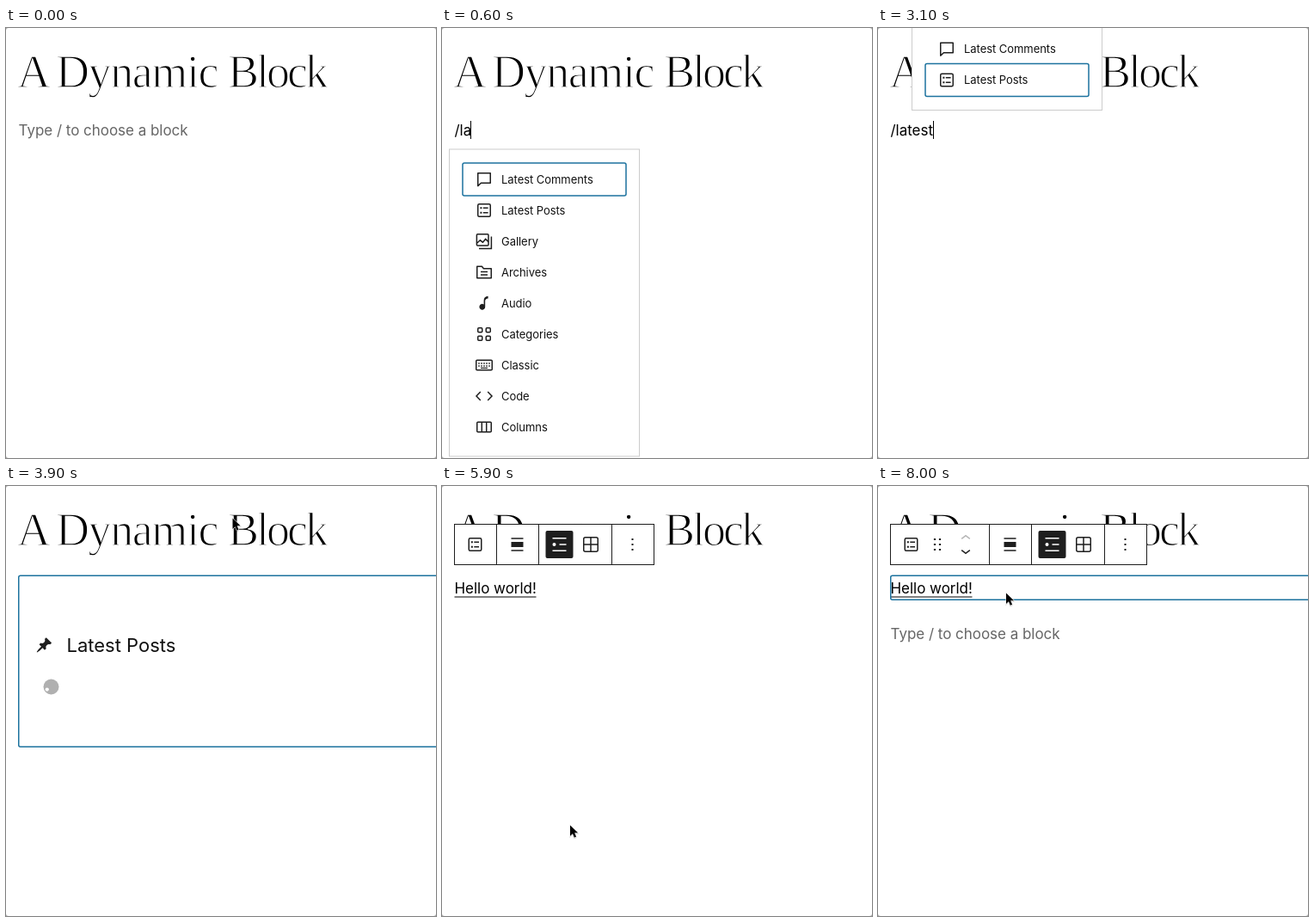
An HTML page that plays this animation: 500x500 px, repeating every 8700 ms.

```html
<!DOCTYPE html>
<html lang="en">
<head>
<meta charset="utf-8">
<title>A Dynamic Block</title>
<style>
  html, body { margin: 0; width: 100%; height: 100%; overflow: hidden; background: #a5a5a5; }
  svg { display: block; width: 500px; height: 500px; }
  text { font-family: Inter, "Open Sans", sans-serif; fill: #111; white-space: pre; }
  .body { font-size: 17px; letter-spacing: -.03px; fill: #000; }
  .hint { fill: #666; }
  .item { font-size: 13px; letter-spacing: -.05px; }
  .head { font-size: 22px; }
  /* A white outline thins the strokes to a light cut. */
  .title { font: 54px "Liberation Serif", serif; fill: #000; stroke: #fff; stroke-width: 1.4px; }
  .icon { fill: none; stroke: #1e1e1e; stroke-width: 1.5; }
  .solid { fill: #1e1e1e; stroke: none; }
  .ring { fill: none; stroke: #1c729e; stroke-width: 1.5; }
  .panel { fill: #fff; stroke: #ccc; }
  .bar { fill: #fff; stroke: #1e1e1e; }
</style>
</head>
<body>
<svg id="stage" viewBox="0 0 500 500">
  <rect width="500" height="500" rx="3" fill="#fff"/>
  <text class="title" y="69"><tspan x="13">A</tspan><tspan x="58" letter-spacing="-1.4">Dynamic</tspan><tspan x="258" letter-spacing="-3">Block</tspan></text>

  <text id="hint" class="body hint" x="14.5" y="125">Type / to choose a block</text>
  <text id="typed" class="body" x="14.5" y="125"></text>

  <g id="hello">
    <text class="body" x="14.5" y="125">Hello world!</text>
    <path d="M14.5 129H109.5" stroke="#000"/>
  </g>

  <g id="loading">
    <path class="solid" transform="translate(34.5 175)" d="M10.44 3.02l1.82-1.82 6.36 6.35-1.83 1.82c-1.05-.68-2.48-.57-3.41.36l-.75.75c-.92.93-1.04 2.35-.35 3.41l-1.83 1.82-2.41-2.41-2.8 2.79c-.42.42-3.38 2.71-3.8 2.29s1.86-3.39 2.28-3.81l2.79-2.79L4.1 9.36l1.83-1.82c1.05.69 2.48.57 3.4-.36l.75-.75c.93-.92 1.05-2.35.36-3.41z"/>
    <text class="head" x="70.5" y="192.5">Latest Posts</text>
    <circle cx="52.5" cy="233.5" r="9" fill="#b0b0b0"/>
    <circle id="dot" r="2.1" fill="#fff"/>
  </g>
  <rect id="frame" class="ring" x="14.75" y="104.25" width="520" rx="2"/>
  <g id="bars"></g>
  <path id="caret" stroke="#000"/>

  <g id="menu">
    <rect id="panel" class="panel" y="-35" width="221"/>
    <g id="rows"></g>
    <rect id="ring0" class="ring" x="15.5" y="-19" width="190" height="38" rx="2"/>
    <rect id="ring1" class="ring" x="15.5" y="17" width="190" height="38" rx="2"/>
  </g>

  <g id="mouse">
    <g transform="translate(.5 .5) scale(.86)">
      <path d="M0 1v14.5l3.4-3.2 2.2 5.2 2.6-1.1-2.2-5.1h4.6z" fill="#000" opacity=".15" stroke="#000" stroke-width="1.5"/>
      <path d="M0 0v14.5l3.4-3.2 2.2 5.2 2.6-1.1-2.2-5.1h4.6z" fill="#000" stroke="#fff" stroke-width="1.2" paint-order="stroke"/>
    </g>
  </g>
</svg>
<script>
const LOOP = 8700, STEP = 100;
const $ = id => document.getElementById(id);
const path = (d, extra = '') => `<path d="${d}" ${extra}/>`;
const solid = d => path(d, 'class="solid"');
const box = (x, y, w, h, r = 1) => `<rect x="${x}" y="${y}" width="${w}" height="${h}" rx="${r}"/>`;
const dots = (xs, ys, s) =>
  solid(xs.flatMap(x => ys.map(y => `M${x - s / 2} ${y - s / 2}h${s}v${s}h${-s}z`)).join(''));

// Icons are centred on 0,0.
const icons = {
  comment: path('M-7.25 -7.25H7.25V4.25H-3.6L-7.25 7.6Z', 'stroke-linejoin="round"'),
  posts: box(-7.25, -7.25, 14.5, 14.5, 1.5) + path('M-1.2 -2.7H4.6M-1.2 2.7H4.6') + dots([-3.6], [-2.7, 2.7], 2),
  gallery: box(-8.6, -8.2, 13.6, 13.2) + path('M8.4 -5.5V8.4H-6M-8.2 2L-4.6 -1.2L-1.6 1.2L1.6 -2.6L5 .6'),
  archive: path('M-8.25 6.75V-6.75H-2.6L-.6 -4.25H8.25V6.75Z', 'stroke-linejoin="round"') + path('M-4 -.4H4M-4 2.9H4'),
  audio: solid('M4.6 -8.2V-5.6Q1.2 -5.4 1.2 -2.4V4.2A3.4 3.4 0 1 1 -.4 1.4V-3Q-.4 -8 4.6 -8.2Z'),
  grid4: box(-7.25, -7.25, 5, 5) + box(2.25, -7.25, 5, 5) + box(-7.25, 2.25, 5, 5) + box(2.25, 2.25, 5, 5),
  keyboard: box(-9.25, -5.75, 18.5, 11.5) + dots([-6, -3, 0, 3, 6], [-2, 1], 1.6) + path('M-4 3.4H4', 'stroke-width="1.2"'),
  code: path('M-4.2 -5L-9 0L-4.2 5M4.2 -5L9 0L4.2 5'),
  columns: box(-8.25, -5.75, 16.5, 11.5) + path('M-2.7 -5.5V5.5M2.7 -5.5V5.5'),
  align: solid('M-7 -3H7V3H-7ZM-7 -7.7H7V-6.2H-7ZM-7 6.2H7V7.7H-7Z'),
  more: dots([0], [-6, 0, 6], 2),
  drag: dots([-3, 3], [-6, 0, 6], 2.2),
  mover: path('M-4.8 -6.6L0 -10.4L4.8 -6.6', 'stroke="#b5b5b5"') + path('M-4.8 6.6L0 10.4L4.8 6.6'),
  list: '<rect class="solid" x="-16" y="-16" width="32" height="32" rx="2"/>' +
    path('M-8 -7.2H8M0 0H8M-8 7.2H8', 'stroke="#fff"') + '<circle cx="-6" r="2" fill="#fff" stroke="none"/>',
  grid: box(-8.25, -8.25, 16.5, 16.5, 2) + path('M0 -8V8M-8 0H8'),
};
const icon = (name, x, y) => `<g class="icon" transform="translate(${x} ${y})">${icons[name]}</g>`;

const items = [
  ['comment', 'Latest Comments'], ['posts', 'Latest Posts'], ['gallery', 'Gallery'],
  ['archive', 'Archives'], ['audio', 'Audio'], ['grid4', 'Categories'],
  ['keyboard', 'Classic'], ['code', 'Code'], ['columns', 'Columns'],
];
$('rows').innerHTML = items.map(([name, label], i) =>
  `<g>${icon(name, 40.5, i * 36)}<text class="item" x="60.5" y="${i * 36 + 4.8}">${label}</text></g>`).join('');

// A toolbar is a row of groups: a width, then pairs of icon and offset.
function toolbar(groups) {
  let x = 14.5, out = '';
  for (const [width, ...parts] of groups) {
    out += `<rect class="bar" x="${x}" y="44.5" width="${width}" height="47"/>`;
    for (const [name, dx] of parts) out += icon(name, x + dx, 68);
    x += width;
  }
  return `<g>${out}</g>`;
}
const block = ['posts', 24];
const align = [49, ['align', 24]], more = [49, ['more', 24]];
const views = [85, ['list', 24], ['grid', 60.5]];
$('bars').innerHTML =
  toolbar([[49, block], align, more]) +
  toolbar([[49, block], align, views, more]) +
  toolbar([[115, block, ['drag', 54.5], ['mover', 87.5]], align, views, more]);
const bars = [...$('bars').children], rows = [...$('rows').children];

const query = '/latest';
const keyTimes = [100, 400, 500, 700, 800, 1600, 1700];
const caretX = [20.5, 24.5, 33.5, 39.5, 49.5, 58.5, 64.5];
const moves = [
  [3900, 263, 37], [4500, 148.5, 394], [5900, 148.5, 394], [6400, 151.5, 197],
  [6900, 151.5, 197], [7100, 149.5, 54], [7300, 148.5, 124], [LOOP, 148.5, 124],
];

const show = (el, on) => { el.style.display = on ? '' : 'none'; };
const within = (t, a, b) => t >= a && t < b;

function mouseAt(t) {
  const i = Math.max(1, moves.findIndex(m => m[0] > t));
  const [t0, x0, y0] = moves[i - 1], [t1, x1, y1] = moves[i];
  const p = (t - t0) / (t1 - t0), e = p * p * (3 - 2 * p);
  return [x0 + (x1 - x0) * e, y0 + (y1 - y0) * e];
}

function draw(t) {
  const count = keyTimes.filter(k => k <= t).length;
  const typing = within(t, 100, 3200);
  show($('typed'), typing);
  $('typed').textContent = query.slice(0, count);
  show($('hint'), t < 100 || t >= 6500);
  $('hint').setAttribute('y', t < 100 ? 125 : 177.5);

  // Suggestions follow the caret and flip above it once filtered.
  const menuOn = within(t, 200, 3200), full = count < 4;
  show($('menu'), menuOn);
  if (menuOn) {
    $('menu').setAttribute('transform', `translate(${caretX[count - 1] - 25} ${full ? 176 : 24.5})`);
    $('panel').setAttribute('height', full ? 357 : 106);
    rows.forEach((row, i) => show(row, full || i < 2));
    const swap = t < 2400 ? 0 : t < 2500 ? .5 : 1;
    $('ring0').setAttribute('opacity', 1 - swap);
    $('ring1').setAttribute('opacity', swap);
  }

  const blink = within(t, 1300, 1600) || within(t, 2200, 2700);
  const below = within(t, 6500, 6900) || within(t, 7300, 7500);
  show($('caret'), (typing && !blink) || below);
  $('caret').setAttribute('d', below ? 'M14.5 161V182' : `M${caretX[Math.max(0, count - 1)]} 108V129`);

  show($('loading'), within(t, 3200, 5500));
  const a = (111 + (t - 4800) * .36) * Math.PI / 180;
  $('dot').setAttribute('cx', 52.5 + 5.66 * Math.cos(a));
  $('dot').setAttribute('cy', 233.5 + 5.66 * Math.sin(a));
  show($('hello'), t >= 5500);

  show($('frame'), within(t, 3200, 5600) || t >= 7500);
  $('frame').setAttribute('height', t < 5500 ? 199 : 28);
  show(bars[0], within(t, 4100, 5500));
  show(bars[1], within(t, 5500, 6500));
  show(bars[2], t >= 7600);

  show($('mouse'), t >= 3900);
  if (t >= 3900) $('mouse').setAttribute('transform', `translate(${mouseAt(t)})`);
}

const start = performance.now();
function tick() {
  const t = (performance.now() - start) % LOOP;
  draw(Math.floor(t / STEP) * STEP);
  requestAnimationFrame(tick);
}
tick();
</script>
</body>
</html>
```
